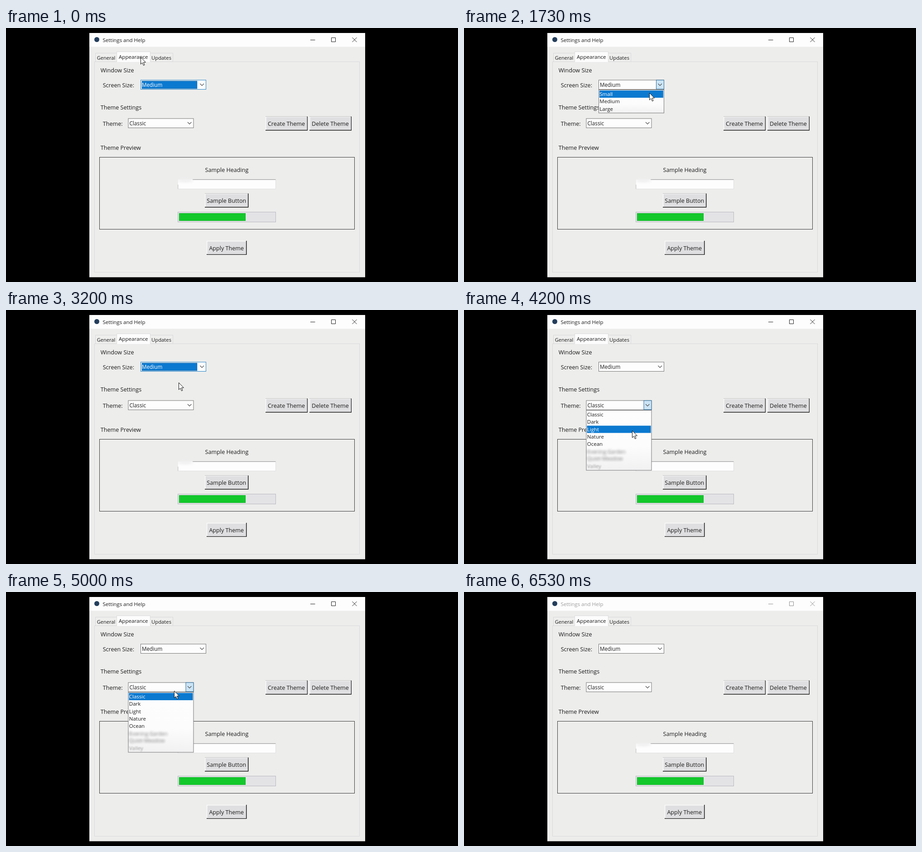
Animation of 998 by 561 pixels, one loop 6.6 s. Source, as an HTML page:

```html
<!DOCTYPE html>
<html lang="en">
<head>
<meta charset="utf-8">
<title>Settings and Help</title>
<style>
  html, body { margin: 0; width: 100%; height: 100%; overflow: hidden; background: #000; }
  svg { display: block; width: 998px; height: 561px; }
  text { font-family: "Open Sans", "Noto Sans", sans-serif; fill: #1c1c1c; white-space: pre; }
</style>
</head>
<body>
<svg id="stage" viewBox="0 0 998 561">
  <defs>
    <filter id="smudge" x="-20%" y="-60%" width="140%" height="220%"><feGaussianBlur stdDeviation="2.6"/></filter>
    <filter id="soft" x="-30%" y="-60%" width="160%" height="220%"><feGaussianBlur stdDeviation="1.1"/></filter>
    <linearGradient id="fade" x2="0" y2="1">
      <stop offset="0" stop-color="#fdfdfd"/><stop offset=".6" stop-color="#fcfcfc"/><stop offset="1" stop-color="#f1f1f2"/>
    </linearGradient>
  </defs>
</svg>
<script>
const LOOP = 6600, BLUE = '#0b79d0', LABEL = 12.6, SMALL = 11.5, ROW = 16.25;
const stage = document.getElementById('stage');

function add(tag, attrs, parent = stage) {
  const el = document.createElementNS('http://www.w3.org/2000/svg', tag);
  for (const key in attrs) el.setAttribute(key, attrs[key]);
  return parent.appendChild(el);
}
const fillRect = (x, y, width, height, fill, parent) => add('rect', { x, y, width, height, fill }, parent);
// One-pixel outline aligned to the pixel grid.
const box = (x, y, w, h, fill, stroke, parent) =>
  add('rect', { x: x + .5, y: y + .5, width: w - 1, height: h - 1, fill, stroke }, parent);
const line = (d, stroke, parent, width = 1) => add('path', { d, stroke, fill: 'none', 'stroke-width': width }, parent);
function label(str, x, y, size = LABEL, parent = stage, extra = {}) {
  const el = add('text', { x, y, 'font-size': size, ...extra }, parent);
  el.textContent = str;
  return el;
}
const show = (el, on) => el.setAttribute('visibility', on ? 'inherit' : 'hidden');

function button(str, x, y, w) {
  fillRect(x, y, w, 31, '#1d1d1d');
  fillRect(x, y, w - 1.5, 29.5, '#fbfbfb');
  fillRect(x + 1.5, y + 1.5, w - 3, 28, '#dfdfe1');
  label(str, x + w / 2 - .5, y + 20.5, LABEL, stage, { 'text-anchor': 'middle' });
}

function combo(value, x, y) {
  const frame = box(x, y, 145, 21.5, '#fdfdfd', '#777');
  const chosen = add('rect', { x: x + 3, y: y + 2.5, width: 122, height: 17, fill: BLUE,
    stroke: '#24557c', 'stroke-dasharray': '1 1' });
  const arrowBox = box(x + 127, y, 18, 21, '#cce4f5', '#2a6f9e');
  line(`M${x + 131.5} ${y + 8.5}l4.2 4.2l4.2 -4.2`, '#4a4a4a', stage, 1.1);
  const text = label(value, x + 3, y + 15, 11.7);
  return state => {
    frame.setAttribute('stroke', state === 'focus' ? '#2583c8' : '#777');
    show(chosen, state === 'focus');
    show(arrowBox, state === 'open');
    text.style.fill = state === 'focus' ? '#fff' : '#1c1c1c';
  };
}

function dropdown(items, x, y, rows) {
  const g = add('g', {});
  box(x, y, 145, rows * ROW + 3.5, 'url(#fade)', '#777', g);
  const bar = fillRect(x + 2, 0, 141, 16, BLUE, g);
  const texts = items.map((str, i) => label(str, x + 2.3, y + 14 + i * ROW, SMALL, g));
  return { g, update(open, active) {
    show(g, open);
    show(bar, active < items.length);
    bar.setAttribute('y', y + 2 + active * ROW);
    texts.forEach((el, i) => el.style.fill = i === active ? '#fff' : '#1c1c1c');
  } };
}

// Window and title bar
fillRect(184, 11, 609, 539.5, '#ededec');
fillRect(184, 11, 609, 30.5, '#fdfdfd');
add('circle', { cx: 200.5, cy: 25.5, r: 5.5, fill: '#243e5c' });
const titleText = label('Settings and Help', 213.5, 30.5, SMALL);
const controls = line('M672 26.5H682.5M718.5 21.5h9v9h-9zM764.5 21l10 10M774.5 21l-10 10', '#222');

// Notebook
box(195, 74, 586, 466, 'none', '#dadadb');
box(197, 55, 48, 20, '#eeeeed', '#d8d8d9');
box(318, 55, 51, 20, '#eeeeed', '#d8d8d9');
box(244, 52, 75, 23, '#fcfcfc', '#dcdcdc');
fillRect(245, 73, 73, 2, '#fcfcfc');
label('General', 200.7, 70, 11.1);
label('Appearance', 249, 68, 11.6);
label('Updates', 321, 70, 11.3);

// Page content
label('Window Size', 208.7, 97.5);
label('Screen Size:', 213.7, 130.5);
label('Theme Settings', 208.7, 179.5);
label('Theme:', 213.7, 215.5);
label('Theme Preview', 208.7, 268.5);
button('Create Theme', 573, 195.5, 93);
button('Delete Theme', 670, 195.5, 93);

box(206, 285, 564, 160, 'none', '#3a3a3a');
label('Sample Heading', 487.5, 318.3, LABEL, stage, { 'text-anchor': 'middle' });
fillRect(380, 335, 215.5, 20.5, '#fdfdfd');
line('M412 334.8H595.5', '#858585');
line('M379.8 346V355.5', '#bbb');
line('M380 355.5H595.5V335', '#e0e0e0');
add('ellipse', { cx: 396, cy: 337, rx: 17, ry: 4, fill: '#f0f0f0', filter: 'url(#smudge)' });
button('Sample Button', 439, 365.5, 96.5);
box(379, 406, 217, 23, '#e3e3e6', '#b9b9c0');
box(382, 409, 147, 17, '#13c82b', '#0eb326');
button('Apply Theme', 443, 470, 88.5);

const screenCombo = combo('Medium', 297, 114.5);
const themeCombo = combo('Classic', 269.5, 199.5);
const screenList = dropdown(['Small', 'Medium', 'Large'], 297, 136, 3);
const themeList = dropdown(['Classic', 'Dark', 'Light', 'Nature', 'Ocean'], 269.5, 221, 8);
label('Evening Garden', 272, 317, SMALL, themeList.g, { filter: 'url(#smudge)', opacity: .6 });
label('Quiet Meadow', 272, 332, SMALL, themeList.g, { filter: 'url(#smudge)', opacity: .6 });
label('Valley', 272, 349, SMALL, themeList.g, { filter: 'url(#soft)', opacity: .4 });

const cursor = add('path', { d: 'M.5 .5V16L4 12.7L6.6 18.6L9 17.5L6.5 11.8H11.4Z',
  fill: '#fff', stroke: '#111', 'stroke-linejoin': 'round' });

// Pointer stops: time, x, y
const stops = [
  [0, 297, 64], [200, 297, 64], [670, 385, 108], [1000, 432, 124], [1330, 432, 124],
  [1730, 409, 143], [2130, 398, 174], [2470, 385, 157], [2800, 381, 157], [3200, 381, 160],
  [3470, 404, 209], [3670, 404, 209], [4200, 371, 266], [4530, 370, 318], [5000, 371, 218],
  [5200, 371, 227], [5470, 371, 227], [6130, 806, 130]
];
function pointerAt(t) {
  const next = stops.findIndex(s => s[0] > t);
  if (next < 0) return stops.at(-1).slice(1);
  const [t0, x0, y0] = stops[next - 1], [t1, x1, y1] = stops[next];
  const k = (t - t0) / (t1 - t0), ease = k * k * (3 - 2 * k);
  return [x0 + (x1 - x0) * ease, y0 + (y1 - y0) * ease];
}
// The picture steps three times every 200 ms.
function snap(t) {
  const rest = t % 200;
  return t - rest + (rest < 70 ? 0 : rest < 130 ? 70 : 130);
}
const between = (t, from, to) => t >= from && t < to;

function render(now) {
  const t = snap(now % LOOP), [x, y] = pointerAt(t);
  const screenOpen = between(t, 1130, 2600), themeOpen = between(t, 3600, 5330);
  const active = t < 6130;
  const rowAt = (top, count) => Math.max(0, Math.min(count - 1, Math.floor((y - top) / ROW)));

  screenCombo(screenOpen ? 'open' : t < 3600 ? 'focus' : 'idle');
  themeCombo(themeOpen ? 'open' : t >= 5330 && active ? 'focus' : 'idle');
  screenList.update(screenOpen, y < 137 ? 1 : rowAt(138, 3));
  themeList.update(themeOpen, rowAt(223, 8));

  titleText.style.fill = active ? '#1c1c1c' : '#9c9c9c';
  controls.setAttribute('stroke', active ? '#222' : '#8f8f8f');
  cursor.setAttribute('transform', `translate(${x.toFixed(1)} ${y.toFixed(1)})`);
  show(cursor, active);
}

const start = performance.now();
function tick() {
  render(performance.now() - start);
  requestAnimationFrame(tick);
}
tick();
</script>
</body>
</html>
```
